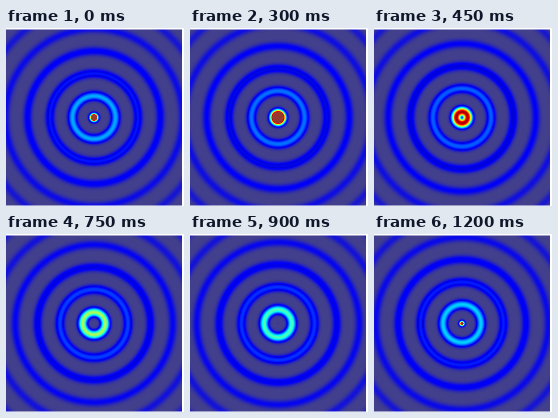
A matplotlib script that plays this animation: 178x178 px, repeating every 1.35 s.

```python
import numpy as np
import matplotlib.pyplot as plt
from matplotlib.animation import FuncAnimation
from matplotlib.colors import LinearSegmentedColormap

SIZE, DPI = 178, 100
W, H = 176, 177          # painted area, leaving a thin white rim
FRAMES, STEP = 9, 150
SPACING = 22.3           # distance between crests
START = 21.9             # crest radius at time zero
STRENGTH = 6.4


def rgb(r, g, b):
    return r / 255, g / 255, b / 255


# Jet whose flat ends fade to grey, with a darker step after the first blue
cmap = LinearSegmentedColormap.from_list("wave", [
    (0.0, rgb(66, 63, 141)),
    (0.085, rgb(0, 0, 250)),
    (0.1, rgb(0, 0, 245)),
    (0.12, rgb(0, 0, 215)),
    (0.14, rgb(0, 15, 255)),
    (0.375, rgb(0, 255, 255)),
    (0.625, rgb(255, 255, 0)),
    (0.875, rgb(255, 0, 0)),
    (0.97, rgb(160, 0, 0)),
    (1.0, rgb(150, 56, 48)),
], N=1024)

x = np.arange(W) + 0.5 - W / 2
y = np.arange(H) + 0.5 - H / 2
radius = np.hypot(*np.meshgrid(x, y))
falloff = STRENGTH / np.sqrt(radius**2 + 3)


def wave(phase):
    """Circular crests moving outwards, fading as 1/r."""
    crest = START + SPACING * phase
    pulse = np.cos(np.pi * (radius - crest) / SPACING) ** 6
    return np.clip(falloff * pulse, 0, 1)


fig = plt.figure(figsize=(SIZE / DPI, SIZE / DPI), dpi=DPI, facecolor="white")
ax = fig.add_axes([0, 0, W / SIZE, H / SIZE])
ax.axis("off")
image = ax.imshow(wave(0), cmap=cmap, vmin=0, vmax=1,
                  interpolation="nearest", aspect="auto")

# Soft upper and lower edges
for edge in (-0.5, H - 1.5):
    ax.axhspan(edge, edge + 1, color="white", alpha=0.5, lw=0)


def update(i):
    image.set_data(wave(i / FRAMES))
    return [image]


anim = FuncAnimation(fig, update, frames=FRAMES, interval=STEP,
                     repeat=True, repeat_delay=0)
plt.show()
```
